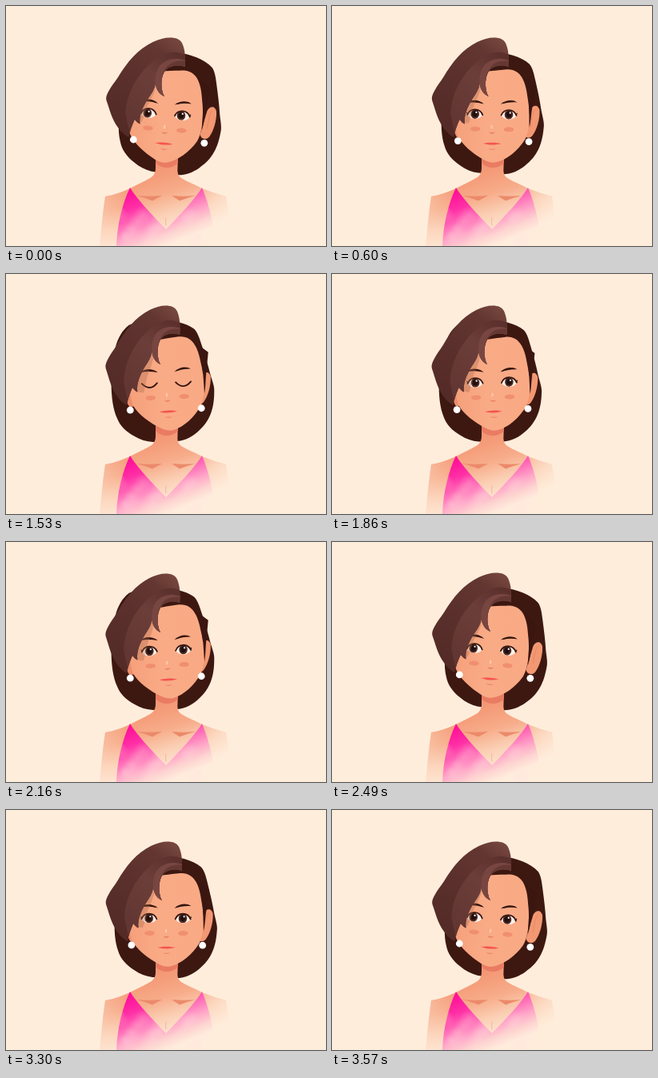
Recreate the animation shown at these times as an HTML page with a canvas. Size 400 px wide and 300 px high, loop 3600 ms.

```html
<!DOCTYPE html>
<html lang="en">
<head>
<meta charset="utf-8">
<title>Portrait</title>
<style>
  html, body { margin: 0; width: 100%; height: 100%; overflow: hidden; background: #ffeddc; }
  canvas { display: block; width: 400px; height: 300px; }
</style>
</head>
<body>
<canvas id="stage" width="400" height="300"></canvas>
<script>
const ctx = document.getElementById('stage').getContext('2d');
const LOOP = 3600;
const BG = '#ffeddc';
const INK = '#35160f';

// [time, value] keys, eased in between
const TURN = [[0, 1], [330, 1], [960, 0], [1050, 0], [1400, .2], [1620, .2], [1880, .36],
  [2130, .2], [2180, .2], [2460, 1], [2520, 1], [2780, .45], [3240, .45], [3510, 1], [LOOP, 1]];
const LOOK = [[0, -1.5], [330, -1.5], [600, 0], [960, 2], [1290, 2], [1410, 0], [2180, 0],
  [2460, -1.5], [2520, -1.5], [2780, 0], [3240, 0], [3510, -1.5], [LOOP, -1.5]];
const BLINK = [[0, 0], [1290, 0], [1410, 1], [1650, 1], [1800, 0], [LOOP, 0]];
const LIFT = [[0, 0], [2180, 0], [2400, -1.5], [2650, 0], [LOOP, 0]];

function valueAt(keys, t) {
  const i = Math.max(1, keys.findIndex(key => key[0] >= t));
  const [t0, a] = keys[i - 1], [t1, b] = keys[i];
  const p = (t - t0) / (t1 - t0);
  return a + (b - a) * (1 - Math.cos(Math.PI * p)) / 2;
}

function linear(x0, y0, x1, y1, ...stops) {
  const g = ctx.createLinearGradient(x0, y0, x1, y1);
  stops.forEach(([p, color]) => g.addColorStop(p, color));
  return g;
}

function fill(d, color) {
  ctx.fillStyle = color;
  ctx.fill(new Path2D(d));
}

function line(d, color, width) {
  ctx.strokeStyle = color;
  ctx.lineWidth = width;
  ctx.lineCap = 'round';
  ctx.stroke(new Path2D(d));
}

function oval(x, y, rx, ry, color) {
  ctx.fillStyle = color;
  ctx.beginPath();
  ctx.ellipse(x, y, rx, ry, 0, 0, Math.PI * 2);
  ctx.fill();
}

function group(x, y, draw) {
  ctx.save();
  ctx.translate(x, y);
  draw();
  ctx.restore();
}

function clipped(d, draw) {
  ctx.save();
  ctx.clip(new Path2D(d));
  draw();
  ctx.restore();
}

function turned(x, y, dx, dy, degrees, draw) {
  ctx.save();
  ctx.translate(x + dx, y + dy);
  ctx.rotate(degrees * Math.PI / 180);
  ctx.translate(-x, -y);
  draw();
  ctx.restore();
}

const BACK_HAIR = 'M200 58C214 58 233 62 243.6 71.4C248 76 250 85 252 93C255 105 258 117 260 129' +
  'C262 138 264.5 145 263.5 151C262 175 254 188 242 198C234 205 224 210 213 210L183 209' +
  'C175 208 167 205 160.5 200.4C150 194 143 186 140 176C136 165 134.5 150 136 129C137 112 138 100 144 88' +
  'C148 76 154 67 163 61C175 57 188 57 200 58Z';
const BODY = 'M187 180L187 202C187 208 185 212 181 214.5C173 219.5 164 223 155 228C146 232 136 236 124 238' +
  'C121 258 119 280 117 300L282 300C280 280 278 258 275 238C265 235 255 232 245 228C236 223 227 220 219 215' +
  'C215 212 214 208 214.5 202L215 180Z';
const DRESS = 'M155 227C162 239 183 262 200 279C217 262 238 239 245 227' +
  'C254 248 260 274 262 300L138 300C139 274 145 248 155 227Z';
const FACE = 'M158 100C164 84 190 82 218 79C236 78 242 95 244.5 115C247 128 249 152 242 166' +
  'C233 181 219 192 207 195C202 196.5 197 195.5 191 192.5C177 185 163 174 157 162C152 142 152 118 158 100Z';
const FRINGE = 'M219.5 76C220.5 66 220 54 216 46C211 37 195 38 181 45C163 54 150 70 139 89' +
  'C131 101 123 111 125 118C129 129 131 141 139 152C143 158 148 162 152 164' +
  'C153 157 156 149 159 142C161 144 163 146.5 165.5 147.5C164 137 169 126 175 116' +
  'C180 109 183 104 184 97C185 104 188 110 195 113C190 105 189 83 200 77C208 73 214 74 219.5 76Z';

function drawBody() {
  fill(BODY, linear(175, 200, 202, 290,
    [0, '#f39471'], [.2, '#f59e7b'], [.42, '#f7ac8a'], [.68, '#fbcfb4'], [1, BG]));
  clipped(BODY, () => {
    const edge = 'rgba(255,237,220,';
    ctx.fillStyle = linear(116, 0, 284, 0, [0, edge + '.35)'], [.2, edge + '0)'], [.75, edge + '0)'], [1, edge + '.6)']);
    ctx.fillRect(110, 225, 180, 75);
  });
  fill('M187 188L215 188L215 196C208 204 194 204 187 196Z', '#e97c63');
  fill('M163 237C173 238 184 238 195 237L183 243.5C177 241 170 239 163 237Z', '#eb8a6b');
  fill('M207 237C217 238 227 238 237 237C230 239 223 241 217 243.5Z', '#eb8a6b');
  fill(DRESS, linear(170, 225, 200, 300,
    [0, '#ff0f98'], [.27, '#ff30a6'], [.43, '#ff60b4'], [.67, '#ffa6c8'], [.84, '#fdd2cf'], [1, BG]));

  // soft clouds near the hem
  clipped(DRESS, () => {
    for (let i = 0; i < 26; i++) {
      const x = 142 + (i * 41.7) % 118;
      const y = 255 + (i * 23.9) % 40;
      const r = 6 + (i * 3.1) % 8;
      const g = ctx.createRadialGradient(x, y, 0, x, y, r);
      g.addColorStop(0, 'rgba(255,222,222,.22)');
      g.addColorStop(1, 'rgba(255,222,222,0)');
      oval(x, y, r, r, g);
    }
  });
  line('M200 265Q199 270 200 274', 'rgba(225,130,100,.5)', .8);
}

function drawEars(k) {
  group(9 * k, 4 * k, () => {
    fill('M247 129C250 123 257 122 258.5 130C259 141 255 154 250 161C246 166 240 165 238 159Z', '#f29872');
    line('M253 129C249 134 248 144 247 151', 'rgba(215,105,80,.35)', 1);
  });
  group(5 * k, -4 * k, () => fill('M151 137C149 145 151 159 156 165L163 164L159 136Z', '#ec8e6c'));
}

function drawEye(x, y, side, gaze, closed) {
  const open = 1 - closed;
  if (open < .12) {
    line(`M${x - 9.5} ${y + .5}Q${x} ${y + 11} ${x + 9.5} ${y + .5}`, INK, 1.9);
    return;
  }
  const top = y + 4 - 11.8 * open;
  const low = y + 6 + 1.8 * open;
  const lid = `M${x - 9.5} ${y + 1}C${x - 6} ${top} ${x + 6} ${top} ${x + 9.5} ${y + 1}`;
  clipped(`${lid}C${x + 6} ${low} ${x - 6} ${low} ${x - 9.5} ${y + 1}Z`, () => {
    ctx.fillStyle = '#fff1e8';
    ctx.fillRect(x - 12, y - 12, 24, 24);
    oval(x + gaze, y + .2, 5.3, 5.8, '#4f2b25');
    oval(x + gaze, y, 3.4, 3.8, '#21100f');
    oval(x + gaze + 1.6, y - 2, 1.1, 1.1, '#fff');
  });
  line(lid, INK, 1.8);
  line(`M${x + side * 9} ${y + .5}l${side * 1.2} -2`, INK, 1.2);
}

function drawFace(gaze, closed) {
  fill(FACE, linear(158, 0, 246, 0, [0, '#f5a17c'], [.4, '#f9ab86'], [1, '#f9aa85']));
  fill('M239 88C243 97 245 111 246.3 125L247 151C249 144 249 134 250.5 125L254 100Z', '#3b1610');

  fill('M168.5 121.5C174 116.6 183 117 190 122.6C183 120.8 176 120.3 168.5 121.5Z', INK);
  fill('M210.5 122.6C217 116.8 226 116 231.5 120C225 119.3 217 120.6 210.5 122.6Z', INK);
  line('M173 119.8Q180 118.3 187 121.2M213.5 121.2Q220 118.2 227.5 118.8', INK, 1.3);

  drawEye(178.9, 135.3, -1, gaze, closed);
  drawEye(221.2, 135.3, 1, gaze, closed);
  clipped(FACE, () => fill('M155 100L186 96C186 110 179 119 176 129C174 137 173 143 171 147C164 147 160 143 157 139Z',
    'rgba(165,100,75,.33)'));

  oval(179.5, 154, 6.3, 3, '#f08f70');
  oval(221.5, 154, 6.3, 3, '#f08f70');
  oval(200, 151, 1.2, 2.6, '#fdc8a8');
  fill('M196.5 157.5Q200.5 158.8 204.5 157.5Q200.5 162 196.5 157.5Z', '#e57a61');
  fill('M189.5 171.8C194 171.2 197 170.3 200.5 170.8C204 170.3 207 171.2 212 171.8C205 174 196 174 189.5 171.8Z', '#f4554f');
  fill('M196 178.2Q201 179.3 206 178.2Q201 182 196 178.2Z', '#ec876a');
}

function drawFringe(k) {
  ctx.save();
  ctx.translate(125 + k, 0);
  ctx.scale(1 + .075 * k, 1);
  ctx.translate(-125, 0);
  fill(FRINGE, linear(130, 150, 216, 42, [0, '#532a26'], [.5, '#5c312d'], [.8, '#633631'], [1, '#78493f']));
  ctx.clip(new Path2D(FRINGE));
  fill('M221 61C206 54 192 58 178 72C163 86 149 108 148 135C150 147 153 155 155 166L198 130L225 84Z',
    linear(150, 140, 215, 65, [0, '#623632'], [.6, '#6c3e3a'], [1, '#5b302d']));
  fill('M221 68C208 64 197 66 189 75C183 84 183 96 185 105L196 115L198 84L222 80Z', '#784641');
  fill('M222 69C210 67 201 70 195 80C190 89 190 100 196 114L202 90L222 80Z', '#653833');
  ctx.restore();
}

function draw(now) {
  const t = now % LOOP;
  const k = valueAt(TURN, t) - .5;
  const lift = valueAt(LIFT, t);
  ctx.fillStyle = BG;
  ctx.fillRect(0, 0, 400, 300);
  turned(200, 140, 12.8 * k, lift, 13 * k, () => fill(BACK_HAIR, '#3d1811'));
  drawBody();
  group(0, lift, () => {
    drawEars(k);
    turned(200, 160, -5 * k, 0, 8.5 * k, () => drawFace(valueAt(LOOK, t), valueAt(BLINK, t)));
    drawFringe(k);
    oval(156.8 + 5 * k, 169 - 4 * k, 4.4, 4.4, '#fff');
    oval(245.6 + 4.5 * k, 169.1 + 4.5 * k, 4.4, 4.4, '#fff');
  });
}

const start = performance.now();
function tick() {
  draw(performance.now() - start);
  requestAnimationFrame(tick);
}
tick();
</script>
</body>
</html>
```
